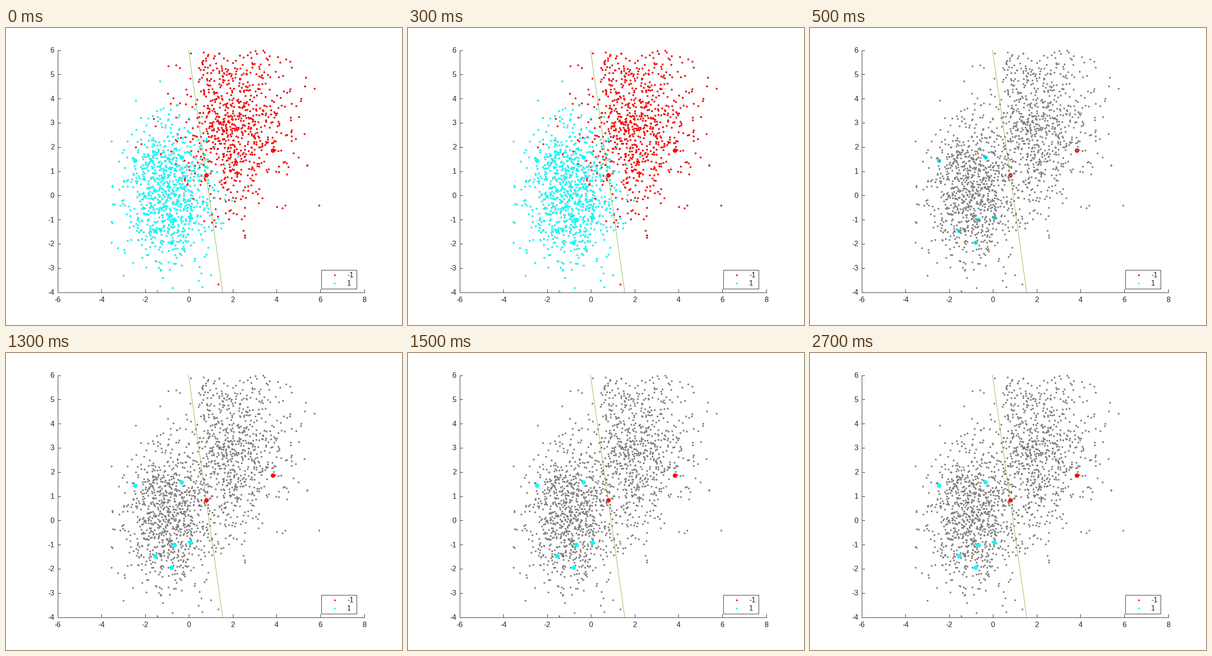
Animation, 864 px wide and 648 px high, one loop 3500 ms. Source, as a matplotlib script:

```python
import numpy as np
import matplotlib.pyplot as plt
from matplotlib.animation import FuncAnimation
from matplotlib.patches import Rectangle

W, H = 864, 648
RED, CYAN, GREY, INK = "#ff0000", "#00ffff", "#808080", "#262626"
GREEN = "#77ac30"
rng = np.random.default_rng(7)

plt.rcParams["font.family"] = "Liberation Sans"
fig = plt.figure(figsize=(W / 72, H / 72), dpi=72, facecolor="white")
ax = fig.add_axes([0, 0, 1, 1])
ax.set(xlim=(0.5, W + 0.5), ylim=(H + 0.5, 0.5))
ax.axis("off")


def px(x):
    return 113 + (np.asarray(x) + 6) * 669 / 14


def py(y):
    return 577 - (np.asarray(y) + 4) * 52.8


def cloud(count, center, spread, keep):
    """Normal cloud in data units, limited to the plot area."""
    points = []
    while len(points) < count:
        x, y = rng.normal(center, spread)
        if -4 < y < 6 and rng.random() < keep(x, y):
            points.append((x, y))
    return np.array(points)


def red_share(x, y):
    """The red cloud thins out abruptly on its left side."""
    if x > 0.45:
        return 1
    return 0.25 if y > 3.8 else 0.6


def dots(points, size, color, z):
    x, y = np.transpose(points)
    return ax.plot(px(x), py(y), "o", ms=size, mew=0, color=color, zorder=z)[0]


def label(x, y, text, align):
    ax.text(x, y + 5.5, text, size=16, color=INK, ha=align, va="baseline")


red_picks = [(3.82, 1.86), (0.8, 0.84)]
cyan_picks = [(-2.47, 1.44), (-0.33, 1.57), (-1.56, -1.48), (-0.67, -1),
              (0.06, -0.91), (-0.79, -1.94)]

red = np.vstack([cloud(800, (2.05, 3.1), (1.3, 1.85), red_share), red_picks])
cyan = np.vstack([cloud(880, (-0.95, 0.15), (1, 1.45), lambda x, y: 1),
                  cyan_picks])

# Axes
ax.plot([113, 113, 782], [49, 577, 577], color=INK, lw=1, zorder=0)
for v in range(-6, 9, 2):
    ax.plot([px(v)] * 2, [577, 570.5], color=INK, lw=1, zorder=0)
    label(px(v), 593, str(v), "center")
for v in range(-4, 7):
    ax.plot([113, 119.5], [py(v)] * 2, color=INK, lw=1, zorder=0)
    label(106, py(v), str(v), "right")

# Legend
ax.add_patch(Rectangle((688, 528), 77, 41, fc="white", ec=INK, lw=1))
for y, color, text in [(539, RED, "-1"), (557, CYAN, "1")]:
    ax.plot(717, y, "o", ms=3.7, mew=0, color=color)
    label(744.5, y, text, "left")

boundary, = ax.plot(px([-0.02, 1.54]), py([6, -4]), color=GREEN, lw=0.9)
dots(np.vstack([red, cyan]), 4, GREY, 3)
classes = [dots(red, 4, RED, 4), dots(cyan, 4, CYAN, 5)]
picks = [dots(red_picks, 9.6, RED, 7), dots(cyan_picks, 9.6, CYAN, 7)]


def update(i):
    stage = min(i, 3)
    for artist in classes:
        artist.set_visible(stage == 0)
    for artist in picks:
        artist.set_zorder(2 if stage == 1 else 7)
    boundary.set_zorder(6 if stage in (0, 3) else 1)
    return [*classes, *picks, boundary]


anim = FuncAnimation(fig, update, frames=7, interval=500, repeat=True,
                     repeat_delay=0, blit=False)
plt.show()
```
